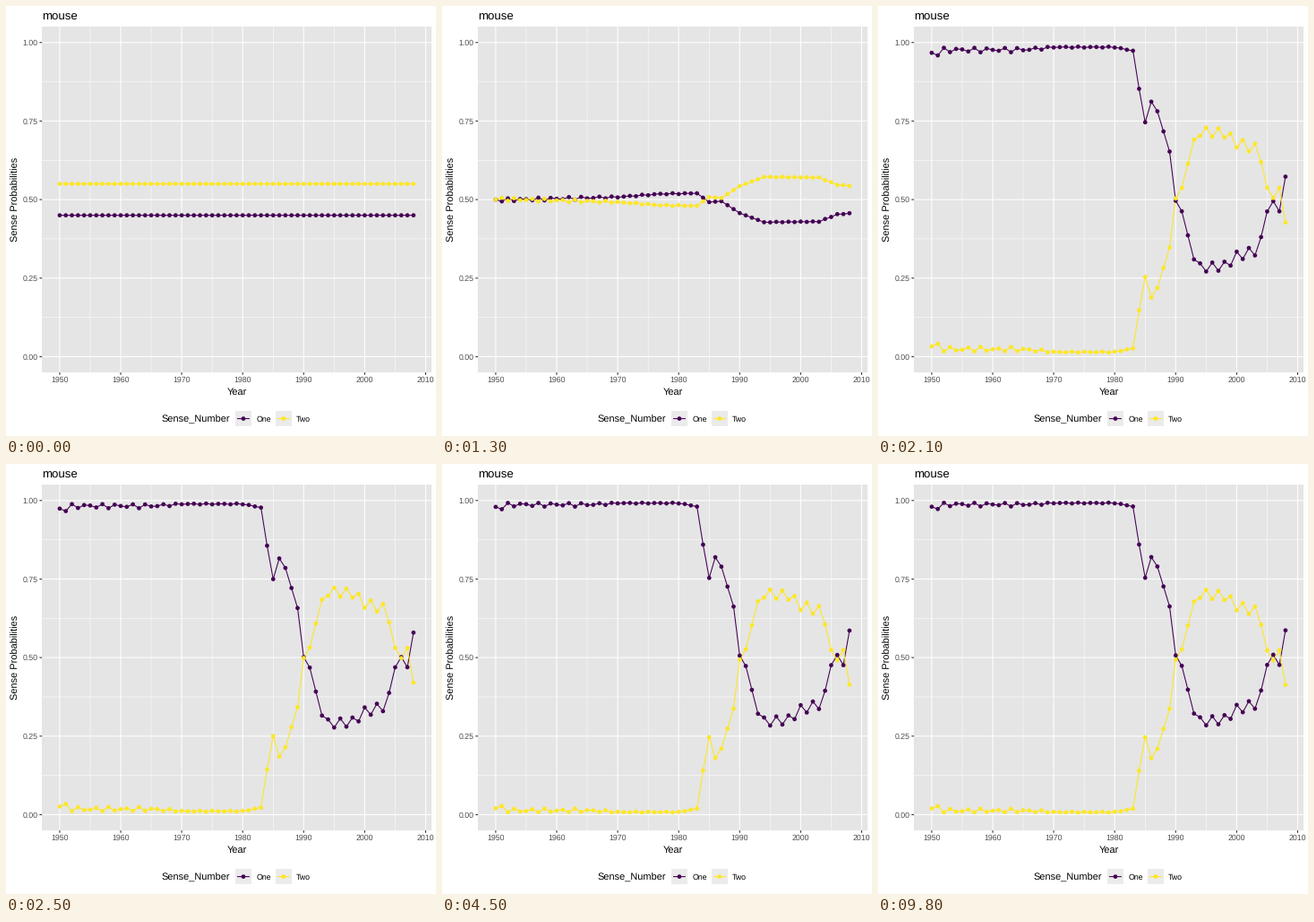
A matplotlib script that plays this animation: 480x480 px, repeating every 10 s.

```python
import numpy as np
import matplotlib.pyplot as plt
from matplotlib.animation import FuncAnimation
from matplotlib.patches import Rectangle

plt.rcParams.update({"font.family": "Liberation Sans", "text.hinting": "none",
                     "path.simplify": False})

SIZE, DPI = 480, 72            # one point equals one pixel
FRAMES, INTERVAL = 100, 100
LEFT, RIGHT, TOP, BOTTOM = 40.2, 474.6, 23.2, 409
PURPLE, YELLOW = "#440154", "#FDE725"

years = np.arange(1950, 2009)


def through(*points):
    """Piecewise linear curve over the years."""
    return np.interp(years, *zip(*points))


def logit(p):
    return np.log(p / (1 - p))


def sigmoid(x):
    return 1 / (1 + np.exp(-x))


# Fading ripple at first, a two-year zigzag after 1995
ripple = (through((1950, 0.5), (1966, 0.45), (1970, 0.18), (1982, 0.15), (1983, 0))
          * np.cos(2 * np.pi * (years - 1952) / 2.45))
zigzag = np.where(years >= 1995, 0.065, 0) * (-1.0) ** years
wobble = ripple + zigzag

# Probability of sense one at four stages of the fit, as logits
START = logit(0.45)
EARLY = 0.04 * wobble + logit(through(
    (1950, 0.498), (1960, 0.503), (1970, 0.508), (1977, 0.518), (1983, 0.52),
    (1985, 0.492), (1987, 0.495), (1990, 0.457), (1994, 0.428), (2003, 0.43),
    (2006, 0.453), (2008, 0.456)))
FINAL = wobble + logit(through(
    (1950, 0.976), (1952, 0.988), (1966, 0.988), (1970, 0.992), (1980, 0.992),
    (1983, 0.981), (1984, 0.86), (1985, 0.754), (1986, 0.82), (1987, 0.79),
    (1989, 0.663), (1990, 0.507), (1991, 0.474), (1993, 0.322), (1995, 0.298),
    (1998, 0.303), (2000, 0.335), (2003, 0.352), (2004, 0.38), (2005, 0.493),
    (2007, 0.493), (2008, 0.571)))
PEAK = logit(sigmoid(FINAL) - through(
    (1950, 0.045), (1964, 0.041), (1970, 0.026), (1982, 0.025), (1984, 0.018),
    (1994, 0.03), (2000, 0.036), (2008, 0.033)))


def sense_one(i):
    """Slow exponential split, quick rise, then a decaying correction."""
    if i < 6:
        x = np.full(len(years), START)
    elif i <= 13:
        x = START + (EARLY - START) * 1.9 ** (i - 13)
    elif i <= 17:
        w = np.interp(i, range(13, 18), [0, 0.11, 0.42, 0.84, 1])
        x = EARLY + (PEAK - EARLY) * w
    else:
        rest = np.exp(np.interp(i, [17, 20, 25, 45, 69], [0, -0.7, -1.5, -3.6, -5.6]))
        x = FINAL + (PEAK - FINAL) * rest
    return sigmoid(x)


def px(year):
    return LEFT + (year - 1947.1) / 63.8 * (RIGHT - LEFT)


def py(p):
    return BOTTOM - (p + 0.05) / 1.1 * (BOTTOM - TOP)


fig = plt.figure(figsize=(SIZE / DPI, SIZE / DPI), dpi=DPI, facecolor="white")
ax = fig.add_axes([0, 0, 1, 1])
ax.set(xlim=(0, SIZE), ylim=(SIZE, 0))
ax.axis("off")


def box(x, y, w, h, color):
    ax.add_patch(Rectangle((x, y), w, h, fc=color, ec="none", zorder=0))


def line(xs, ys, color, width=1.07, z=1, cap="butt"):
    return ax.plot(xs, ys, color=color, lw=width, zorder=z, snap=False,
                   solid_capstyle=cap, solid_joinstyle="round")[0]


def stubs(xs):
    """Tiny separate segments; round caps turn them into sub-pixel dots."""
    xs = np.asarray(xs)
    return np.column_stack([xs - 0.01, xs + 0.01, xs * np.nan]).ravel()


def dots(xs, ys, color, z):
    return line(stubs(xs), np.repeat(ys, 3), color, 4.85, z, "round")


def label(x, y, s, size, color="black", **kw):
    ax.text(x, y, s, size=size, color=color, va="baseline", **kw)


# Panel, grid, ticks
box(LEFT, TOP, RIGHT - LEFT, BOTTOM - TOP, "#E5E5E5")
for year in range(1950, 2011, 5):
    major = year % 10 == 0
    x = px(year)
    line([x, x], [TOP, BOTTOM], "white", 1.07 if major else 0.53)
    if major:
        line([x, x], [BOTTOM, BOTTOM + 2.75], "#333333")
        label(x, 420.4, str(year), 8.8, "#4D4D4D", ha="center")
for k in range(9):
    major = k % 2 == 0
    y = py(k / 8)
    line([LEFT, RIGHT], [y, y], "white", 1.07 if major else 0.53)
    if major:
        line([LEFT - 2.75, LEFT], [y, y], "#333333")
        label(35.3, y + 3.15, f"{k / 8:.2f}", 8.8, "#4D4D4D", ha="right")

# Titles
label(40.2, 15, "mouse", 13.2)
label(257.6, 434, "Year", 11, ha="center")
label(13.4, 216.2, "Sense Probabilities", 11, rotation=90, ha="center",
      rotation_mode="anchor")

# Legend
label(174, 465, "Sense_Number", 11)
for x, name, color in ((256.3, "One", PURPLE), (301.2, "Two", YELLOW)):
    box(x, 452, 17.3, 17.3, "#EBEBEB")
    line([x + 1.7, x + 15.6], [460.6, 460.6], color, z=2)
    dots([x + 8.65], [460.6], color, 3)
    label(x + 22.8, 464, name, 8.8)

# Series
xs = px(years)
series = [(line(xs, xs, c, z=4 + n), dots(xs, xs, c, 6 + n))
          for n, c in enumerate((PURPLE, YELLOW))]


def update(i):
    p = sense_one(i)
    for (curve, points), values in zip(series, (p, 1 - p)):
        ys = py(values)
        curve.set_ydata(ys)
        points.set_ydata(np.repeat(ys, 3))
    return [artist for pair in series for artist in pair]


anim = FuncAnimation(fig, update, frames=FRAMES, interval=INTERVAL,
                     repeat=True, repeat_delay=0)
plt.show()
```
